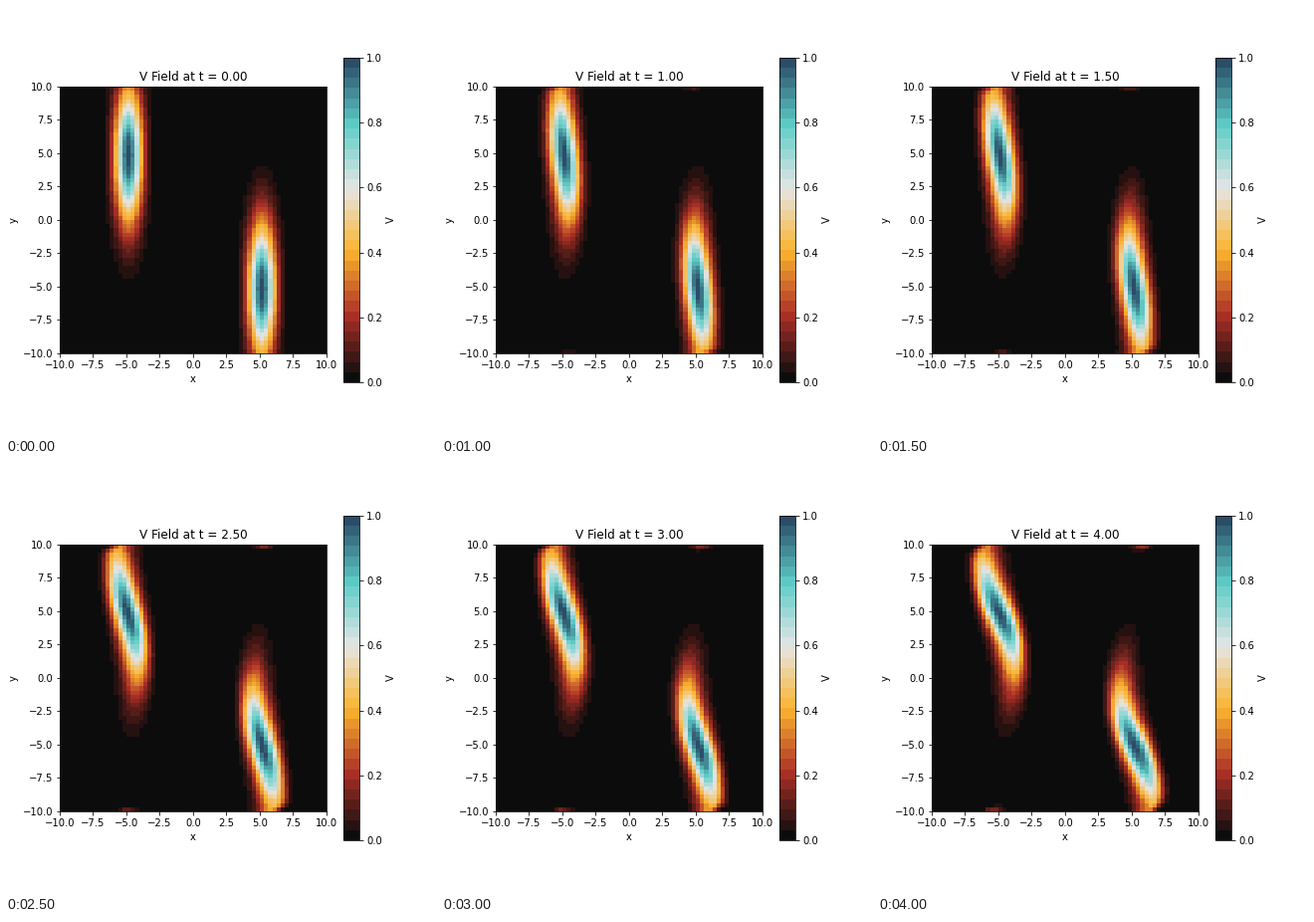
A matplotlib script that plays this animation: 432 px wide and 432 px high, repeating every 4500 ms.

```python
import numpy as np
import matplotlib.pyplot as plt
from matplotlib.animation import FuncAnimation
from matplotlib.colors import LinearSegmentedColormap

N, L = 64, 20.0
DX = L / N
FRAMES, STEP = 9, 0.5
SUBSTEPS = 10

# Rows run downwards, so y falls as the row index grows.
offset = np.arange(N) * DX
X, Y = np.meshgrid(offset - L / 2, L / 2 - offset)

k = 2 * np.pi * np.fft.fftfreq(N, DX)
KX, KR = np.meshgrid(k, k)
K2 = KX**2 + KR**2
K2[0, 0] = 1.0


def blob(cx, cy):
    return np.exp(-(X - cx) ** 2 - (Y - cy) ** 2 / 25)


def velocity(w):
    """Velocity along columns and rows, from the stream function."""
    psi = -np.fft.fft2(w) / K2
    psi[0, 0] = 0
    u = np.fft.ifft2(1j * KR * psi).real
    v = -np.fft.ifft2(1j * KX * psi).real
    return u, v


def advect(f, speed, axis):
    """Third-order upwind-biased advection along one periodic axis."""
    def at(n):
        return np.roll(f, -n, axis)

    back = 2 * at(1) + 3 * f - 6 * at(-1) + at(-2)
    ahead = -at(2) + 6 * at(1) - 3 * f - 2 * at(-1)
    return speed * np.where(speed > 0, back, ahead) / (6 * DX)


def rate(w):
    u, v = velocity(w)
    return -advect(w, u, 1) - advect(w, v, 0)


def advance(w, dt):
    a = w + dt * rate(w)
    b = 0.75 * w + 0.25 * (a + dt * rate(a))
    return w / 3 + 2 / 3 * (b + dt * rate(b))


def simulate():
    w = blob(-5, 5) + blob(5, -5)
    fields = [w]
    for _ in range(FRAMES - 1):
        for _ in range(SUBSTEPS):
            w = advance(w, STEP / SUBSTEPS)
        fields.append(w)
    return fields


fields = simulate()

cmap = LinearSegmentedColormap.from_list(
    "vortex",
    ["#0c0c0c", "#ac3027", "#fbb32f", "#e5e5e5", "#5ecdc8", "#2b4d68"],
    N=32,
)

plt.rcParams["font.family"] = "DejaVu Sans"
plt.rcParams["font.size"] = 10
plt.rcParams["figure.subplot.bottom"] = 0.125

fig, ax = plt.subplots(figsize=(6, 6), dpi=72)
image = ax.imshow(fields[0], cmap=cmap, vmin=0, vmax=1,
                  extent=(-10, 10, -10, 10), interpolation="nearest")
fig.colorbar(image, ax=ax, label="V")
ax.set_xlabel("x")
ax.set_ylabel("y")
title = ax.set_title("V Field at t = 0.00", fontsize=12)


def update(i):
    image.set_data(fields[i])
    title.set_text(f"V Field at t = {i * STEP:.2f}")
    return image, title


anim = FuncAnimation(fig, update, frames=FRAMES, interval=500,
                     repeat=True, repeat_delay=0, blit=False)
plt.show()
```
